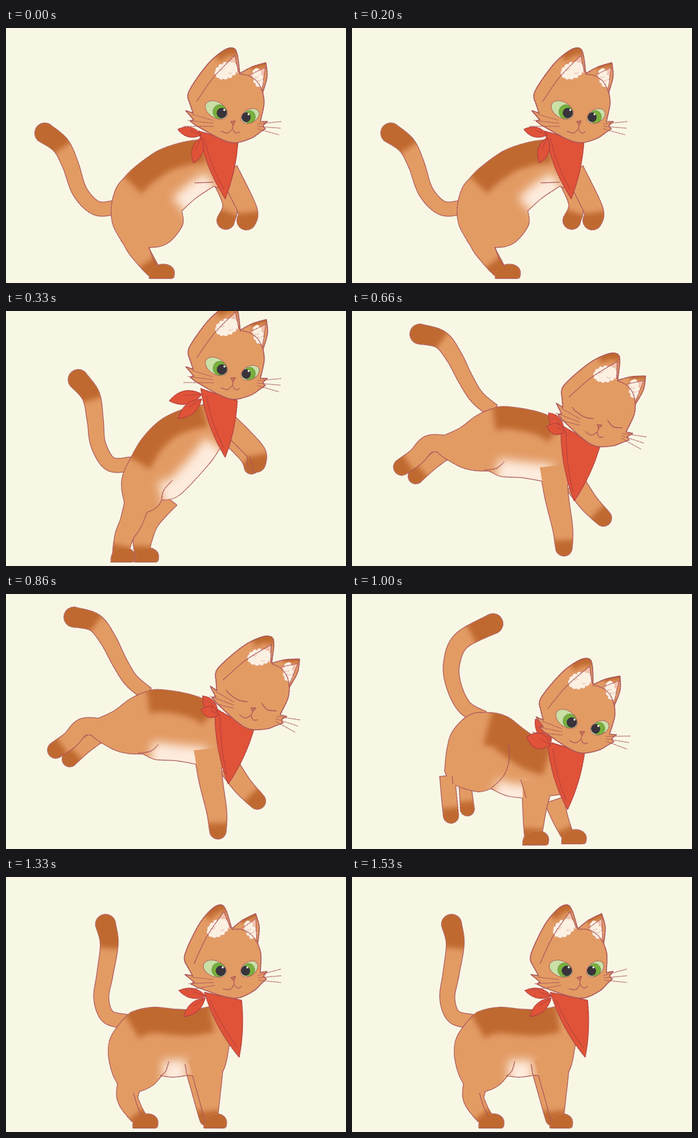
An HTML page with a canvas for the animation above (1.66 s loop, 560 px wide and 420 px high).

```html
<!DOCTYPE html>
<html lang="en">
<head>
<meta charset="utf-8">
<title>Leaping cat</title>
<style>
  html, body { margin: 0; width: 100%; height: 100%; overflow: hidden; background: #f8f7e5; }
  canvas { display: block; width: 560px; height: 420px; }
</style>
</head>
<body>
<canvas id="stage" width="560" height="420"></canvas>
<script>
const ctx = document.getElementById('stage').getContext('2d');
const TURN = Math.PI * 2;
const COLOR = {
  paper: '#f8f7e5', fur: '#e39b64', dark: '#bf6930', light: '#fdebdd',
  line: '#a9545a', scarf: '#e05338', fold: '#b5403f',
  pink: '#f5c3ad', fluff: '#fcf0e2', fluffLine: '#d3a08f',
  eye: '#c9dfa6', iris: '#79b03c', pupil: '#39333c', nose: '#cf7757'
};

const points = text => text.trim().split(/\s+/).map(p => p.split(',').map(Number));
const mix = (a, b, t) => a + (b - a) * t;

// Smooth curve through "x,y" points; a slash turns the point before it into a corner.
function curve(text, closed = false) {
  const path = new Path2D();
  let last = null;
  for (const run of text.split('/')) {
    const pts = points(run);
    if (last) pts.unshift(last);
    else path.moveTo(...pts[0]);
    for (let i = 0; i + 1 < pts.length; i++) {
      const a = pts[i - 1] || pts[i], b = pts[i], c = pts[i + 1], d = pts[i + 2] || c;
      path.bezierCurveTo(
        b[0] + (c[0] - a[0]) / 6, b[1] + (c[1] - a[1]) / 6,
        c[0] - (d[0] - b[0]) / 6, c[1] - (d[1] - b[1]) / 6, c[0], c[1]);
    }
    last = pts[pts.length - 1];
  }
  if (closed) path.closePath();
  return path;
}

// Evenly stepped places with headings along a smooth spine.
function walk(text, steps = 12) {
  const pts = points(text), out = [];
  const along = (i, t, k) => {
    const b = pts[i][k], c = pts[i + 1][k];
    const a = (pts[i - 1] || pts[i])[k], d = (pts[i + 2] || pts[i + 1])[k];
    const m = (c - a) / 2, n = (d - b) / 2;
    return b + t * (m + t * (3 * (c - b) - 2 * m - n + t * (2 * (b - c) + m + n)));
  };
  for (let i = 0; i + 1 < pts.length; i++)
    for (let s = i ? 1 : 0; s <= steps; s++)
      out.push({ x: along(i, s / steps, 0), y: along(i, s / steps, 1) });
  out.forEach((p, i) => {
    const a = out[i - 1] || p, b = out[i + 1] || p;
    p.turn = Math.atan2(b.y - a.y, b.x - a.x);
  });
  return out;
}

// Pencil stroke: a fine line with a grainy edge.
function pencil(path, color = COLOR.line, width = 1.2) {
  ctx.strokeStyle = color;
  ctx.lineWidth = width;
  ctx.stroke(path);
  ctx.setLineDash([1.2, 1.9, 0.8, 1.4]);
  ctx.lineWidth = width + 0.9;
  ctx.stroke(path);
  ctx.setLineDash([]);
}

function fill(path, color) {
  ctx.fillStyle = color;
  ctx.fill(path);
}

function ellipse(x, y, rx, ry = rx, turn = 0) {
  const path = new Path2D();
  path.ellipse(x, y, rx, ry, turn, 0, TURN);
  return path;
}

function inside(path, draw) {
  ctx.save();
  ctx.clip(path);
  draw();
  ctx.restore();
}

function softStroke(path, color, width, blur) {
  ctx.filter = `blur(${blur}px)`;
  ctx.strokeStyle = color;
  ctx.lineWidth = width;
  ctx.stroke(path);
  ctx.filter = 'none';
}

// Tapered limb along a spine, round at its dark tip.
function limb({ spine, r: [r0, r1], tip = 12, flare = 1, foot }) {
  const steps = walk(spine), end = steps[steps.length - 1];
  const path = new Path2D();
  const edge = (p, i, side) => {
    const r = mix(r0, r1, (i / (steps.length - 1)) ** flare);
    path.lineTo(p.x - side * Math.sin(p.turn) * r, p.y + side * Math.cos(p.turn) * r);
  };
  steps.forEach((p, i) => edge(p, i, -1));
  path.arc(end.x, end.y, r1, end.turn - TURN / 4, end.turn + TURN / 4);
  for (let i = steps.length - 1; i >= 0; i--) edge(steps[i], i, 1);
  path.closePath();

  const tipLine = new Path2D();
  let left = tip;
  tipLine.moveTo(end.x + Math.cos(end.turn) * r1 * 2, end.y + Math.sin(end.turn) * r1 * 2);
  tipLine.lineTo(end.x, end.y);
  for (let i = steps.length - 2; i >= 0 && left > 0; i--) {
    left -= Math.hypot(steps[i].x - steps[i + 1].x, steps[i].y - steps[i + 1].y);
    tipLine.lineTo(steps[i].x, steps[i].y);
  }
  const shade = () => softStroke(tipLine, COLOR.dark, r1 * 4, 4);
  return [{ path, shade }, ...(foot ? [paw(foot)] : [])];
}

// Standing paw: a dome on flat ground.
function paw([x, y, w]) {
  const path = new Path2D();
  path.moveTo(x - w / 2 + 1, y);
  path.bezierCurveTo(x - w * 0.56, y - 29, x + w * 0.62, y - 29, x + w / 2, y - 5);
  path.quadraticCurveTo(x + w / 2, y, x + w / 2 - 5, y);
  path.closePath();
  return { path, shade: () => fill(path, COLOR.dark) };
}

function torso({ back, rest, saddle, belly, bellyWidth }) {
  const path = curve(back + ' ' + rest, true);
  const shade = () => {
    softStroke(curve(belly), COLOR.light, bellyWidth, 8);
    softStroke(curve(back), COLOR.dark, saddle * 2, 5);
  };
  return { path, shade };
}

// One outline around all pieces together.
function drawTogether(pieces) {
  for (const p of pieces) pencil(p.path, COLOR.line, 2);
  for (const p of pieces) {
    fill(p.path, COLOR.fur);
    inside(p.path, p.shade);
  }
}

// Triangular cloth with bowed sides and two leaf-shaped knot ends.
function drawScarf({ cloth, ends }) {
  const [[ax, ay], [bx, by], [tx, ty]] = points(cloth);
  const path = new Path2D();
  path.moveTo(ax, ay);
  path.lineTo(bx, by);
  path.quadraticCurveTo((bx + tx) / 2 + 7, (by + ty) / 2 + 3, tx, ty);
  path.quadraticCurveTo((ax + tx) / 2 - 12, (ay + ty) / 2 + 4, ax, ay);
  path.closePath();
  fill(path, COLOR.scarf);
  pencil(path, COLOR.fold, 1);
  const fold = new Path2D();
  fold.moveTo(ax + 9, ay + 12);
  fold.quadraticCurveTo((ax + tx) / 2 - 3, (ay + ty) / 2, tx - 2, ty - 15);
  pencil(fold, COLOR.fold, 0.7);

  for (const [text, bulge] of ends) {
    const [[kx, ky], [ex, ey]] = points(text);
    const len = Math.hypot(ex - kx, ey - ky);
    const nx = (ky - ey) / len * bulge * 2, ny = (ex - kx) / len * bulge * 2;
    const mx = mix(kx, ex, 0.5), my = mix(ky, ey, 0.5);
    const leaf = new Path2D();
    leaf.moveTo(kx, ky);
    leaf.quadraticCurveTo(mx + nx, my + ny, ex, ey);
    leaf.quadraticCurveTo(mx - nx, my - ny, kx, ky);
    fill(leaf, COLOR.scarf);
    pencil(leaf, COLOR.fold, 1);
    pencil(curve(`${kx},${ky} ${mx + nx / 6},${my + ny / 6}`), COLOR.fold, 0.7);
  }
}

const NOSE = [374, 157];
const HEAD = curve('303,125 301,105 331,61 357,38 374,33 381,44 385,75 / 405,64 428,57 / 430,80 423,106 / 425,125 419,154 / 430,154 / 423,161 / 427,166 / 418,172 / 403,182 376,189 350,181 312,160 / 303,153 / 309,151 / 296,136 / 308,140 / 303,125', true);

// Ring of small round tufts.
function drawFluff(x, y, rx, ry, turn, count) {
  const tufts = Array.from({ length: count }, (_, i) => {
    const a = i / count * TURN, u = Math.cos(a) * rx, v = Math.sin(a) * ry;
    return ellipse(x + u * Math.cos(turn) - v * Math.sin(turn), y + u * Math.sin(turn) + v * Math.cos(turn), 4);
  });
  for (const t of tufts) pencil(t, COLOR.fluffLine, 0.6);
  for (const t of tufts) fill(t, COLOR.fluff);
  fill(ellipse(x, y, rx, ry, turn), COLOR.fluff);
  for (const k of [-0.5, 0.4]) {
    const arc = new Path2D();
    arc.arc(x + k * rx, y + k * 6, 3, 0.3, 2.8);
    pencil(arc, COLOR.fluffLine, 0.3);
  }
}

function drawEye(eye, iris, pupil) {
  const path = ellipse(...eye);
  fill(path, COLOR.eye);
  inside(path, () => {
    fill(ellipse(...iris), COLOR.iris);
    pencil(ellipse(...iris), '#5d8a3a', 0.5);
    fill(ellipse(...pupil), COLOR.pupil);
  });
  pencil(path, COLOR.line, 0.5);
  fill(ellipse(pupil[0] + 4, pupil[1] - 5, 1.7), COLOR.fluff);
}

function drawFace(closed) {
  if (closed) {
    pencil(curve('323,136 330,141 347,147 362,146'), COLOR.line, 1);
    pencil(curve('385,143 397,151 412,149'), COLOR.line, 1);
  } else {
    drawEye([346.5, 135, 20, 13, 0.55], [352, 138, 11, 11.5], [355.5, 140, 8.5]);
    drawEye([402, 145, 16, 11, -0.5], [401, 146.5, 9.5, 10.5], [395.5, 147, 7.5, 8]);
  }
  const nose = curve('370,154 378,153 / 374,160 / 370,154', true);
  fill(nose, COLOR.nose);
  pencil(nose, COLOR.line, 0.8);
  pencil(curve('374,160 373,166 / 365,173 354,170'), COLOR.line, 0.9);
  pencil(curve('373,166 378,173 385,171'), COLOR.line, 0.9);
  for (const i of [-1, 0, 1]) {
    pencil(curve(`${341 + i},${157 + 5 * i} ${299 - 7 * i},${152 + 10 * i}`), COLOR.line, 0.5);
    pencil(curve(`414,${162 + 4 * i} ${452 - 2 * i},${165 + 11 * i}`), COLOR.line, 0.5);
  }
}

function drawHead([x, y, turn], closed) {
  ctx.save();
  ctx.translate(x, y);
  ctx.rotate(turn * TURN / 360);
  ctx.translate(-NOSE[0], -NOSE[1]);
  fill(HEAD, COLOR.fur);
  inside(HEAD, () => {
    softStroke(curve('345,45 362,34 384,32'), COLOR.dark, 24, 4);
    softStroke(curve('402,64 416,57 434,55'), COLOR.dark, 16, 3);
    fill(curve('346,78 377,45 / 383,74', true), COLOR.pink);
    fill(curve('402,77 427,65 / 422,101', true), COLOR.pink);
    drawFluff(363, 70, 16, 10, -0.4, 13);
    drawFluff(415, 82, 5, 12, -0.25, 9);
  });
  pencil(HEAD);
  pencil(curve('314,121 342,81 377,45 / 383,73'), COLOR.line, 0.9);
  pencil(curve('385,76 401,79 415,90 423,107'), COLOR.line, 0.9);
  pencil(curve('402,77 427,65 / 422,102'), COLOR.line, 0.6);
  drawFace(closed);
  ctx.restore();
}

const tail = spine => ({ spine, r: [11, 16], flare: 2, tip: 38 });

// Limbs in "far" lie behind the body, those in "near" join its outline.
const crouch = {
  time: 330, head: [374, 157, 0],
  far: [
    tail('186,294 150,297 122,270 106,225 90,193 64,173'),
    { spine: '350,250 369,290 362,317', r: [9, 14] }
  ],
  body: {
    back: '324,184 290,189 250,203 212,230 196,246', saddle: 38,
    rest: '182,264 174,295 177,325 194,356 / 236,361 266,354 290,325 289,301 / 312,280 342,260 / 362,262 376,226 / 378,180',
    belly: '290,298 312,278 342,258', bellyWidth: 48
  },
  near: [
    { spine: '212,345 218,364 241,398', r: [22, 11], foot: [256, 412, 41] },
    { spine: '366,235 397,298 396,317', r: [16, 15] }
  ],
  lines: ['311,255 342,254', '236,362 243,382 252,393'],
  scarf: { cloth: '318,170 382,188 361,281', ends: [['322,176 283,167', 8], ['322,180 309,222', 9]] }
};

const rise = {
  time: 330, head: [374, 113.5, 0.5],
  far: [
    tail('206,252 172,252 152,220 147,180 140,140 119,113'),
    { spine: '262,305 234,342 225,375 224,400', r: [24, 11], foot: [231, 413, 39] },
    { spine: '362,208 395,240 404,257', r: [8, 11] }
  ],
  body: {
    back: '324,155 290,163 255,180 225,210 206,242', saddle: 36,
    rest: '193,270 191,292 196,318 / 210,340 / 245,325 256,311 / 285,303 332,254 352,226 / 368,200 / 380,145',
    belly: '258,310 285,303 330,256 352,226', bellyWidth: 60
  },
  near: [
    { spine: '219,305 207,345 195,370 188,400', r: [21, 12], foot: [192, 413, 39] },
    { spine: '362,182 390,209 412,234 412,250', r: [16, 15] }
  ],
  lines: ['274,279 260,295 256,311', '401,240 409,264'],
  scarf: { cloth: '321,128 381,148 361,241', ends: [['323,137 269,148', 11], ['322,145 284,177', 9]] }
};

const leap = {
  time: 340, head: [407, 191, 14], closed: true,
  far: [
    tail('232,164 206,142 187,112 168,75 146,47 112,38'),
    { spine: '165,225 130,250 105,272', r: [11, 12] },
    { spine: '368,285 390,316 414,341', r: [17, 13] }
  ],
  body: {
    back: '345,188 330,176 300,165 255,158 232,161', saddle: 36,
    rest: '205,173 178,193 150,206 / 140,230 174,254 200,262 226,263 / 246,272 280,274 315,280 / 352,290 / 395,225',
    belly: '238,270 280,275 330,280', bellyWidth: 54
  },
  near: [
    { spine: '160,220 127,219 106,240 82,257', r: [14, 13] },
    { spine: '331,255 337,305 347,358 349,390', r: [22, 13] }
  ],
  lines: ['218,262 238,259 251,248'],
  scarf: { cloth: '344,188 408,224 366,313', ends: [['348,198 324,168', 9], ['351,199 321,190', 9]] }
};

const land = {
  time: 330, head: [379, 230, 5],
  far: [
    tail('216,204 186,187 168,152 164,115 180,77 232,49'),
    { spine: '186,312 190,354', r: [9, 11] },
    { spine: '333,340 343,370 356,400', r: [16, 9], foot: [365, 411, 40] }
  ],
  body: {
    back: '330,246 306,239 280,221 256,203 230,196', saddle: 54,
    rest: '195,199 167,225 157,255 153,292 / 166,312 206,325 229,320 / 256,332 290,336 / 342,330 / 376,260',
    belly: '234,324 256,332 292,336', bellyWidth: 42
  },
  near: [
    { spine: '157,300 160,335 163,365', r: [12, 12] },
    { spine: '306,310 301,350 298,400', r: [26, 13], foot: [302, 413, 42] }
  ],
  lines: ['257,248 259,272 250,299 229,320', '278,306 287,336', '165,300 166,313'],
  scarf: { cloth: '322,243 383,262 355,355', ends: [['328,243 302,206', 10], ['327,249 288,235', 13]] }
};

const stand = {
  time: 330, head: [375, 168, -9.8],
  far: [
    tail('198,238 168,230 157,200 163,160 170,110 164,78'),
    { spine: '309,320 328,400', r: [12, 8] }
  ],
  body: {
    back: '336,214 306,219 276,218 245,215 215,220 198,230', saddle: 42,
    rest: '174,262 169,290 176,324 190,350 / 217,353 241,343 256,327 / 276,329 300,326 / 352,325 367,279 / 384,220',
    belly: '258,328 298,327', bellyWidth: 52
  },
  near: [
    { spine: '205,335 200,362 210,384 222,400', r: [20, 11], foot: [229, 413, 41] },
    { spine: '330,300 334,350 338,398', r: [30, 9], foot: [344, 413, 37] }
  ],
  lines: ['268,304 263,320 254,328', '295,308 298,326', '210,356 216,376 224,394'],
  scarf: { cloth: '327,190 388,203 384,297', ends: [['329,196 285,187', 8], ['328,199 293,230', 8]] }
};

const poses = [crouch, rise, leap, land, stand];
const LOOP = poses.reduce((sum, p) => sum + p.time, 0);

function drawPose({ head, closed, far, body, near, lines, scarf }) {
  fill(new Path2D('M0 0H560V420H0Z'), COLOR.paper);
  ctx.lineJoin = 'round';
  for (const l of far) drawTogether(limb(l));
  drawTogether([torso(body), ...near.flatMap(limb)]);
  for (const l of lines) pencil(curve(l), COLOR.line, 0.9);
  drawScarf(scarf);
  drawHead(head, closed);
}

function poseAt(time) {
  let rest = time % LOOP;
  return poses.find(p => (rest -= p.time) < 0);
}

const start = performance.now();
let shown = null;
function tick() {
  const pose = poseAt(performance.now() - start);
  if (pose !== shown) drawPose(shown = pose);
  requestAnimationFrame(tick);
}
tick();
</script>
</body>
</html>
```
